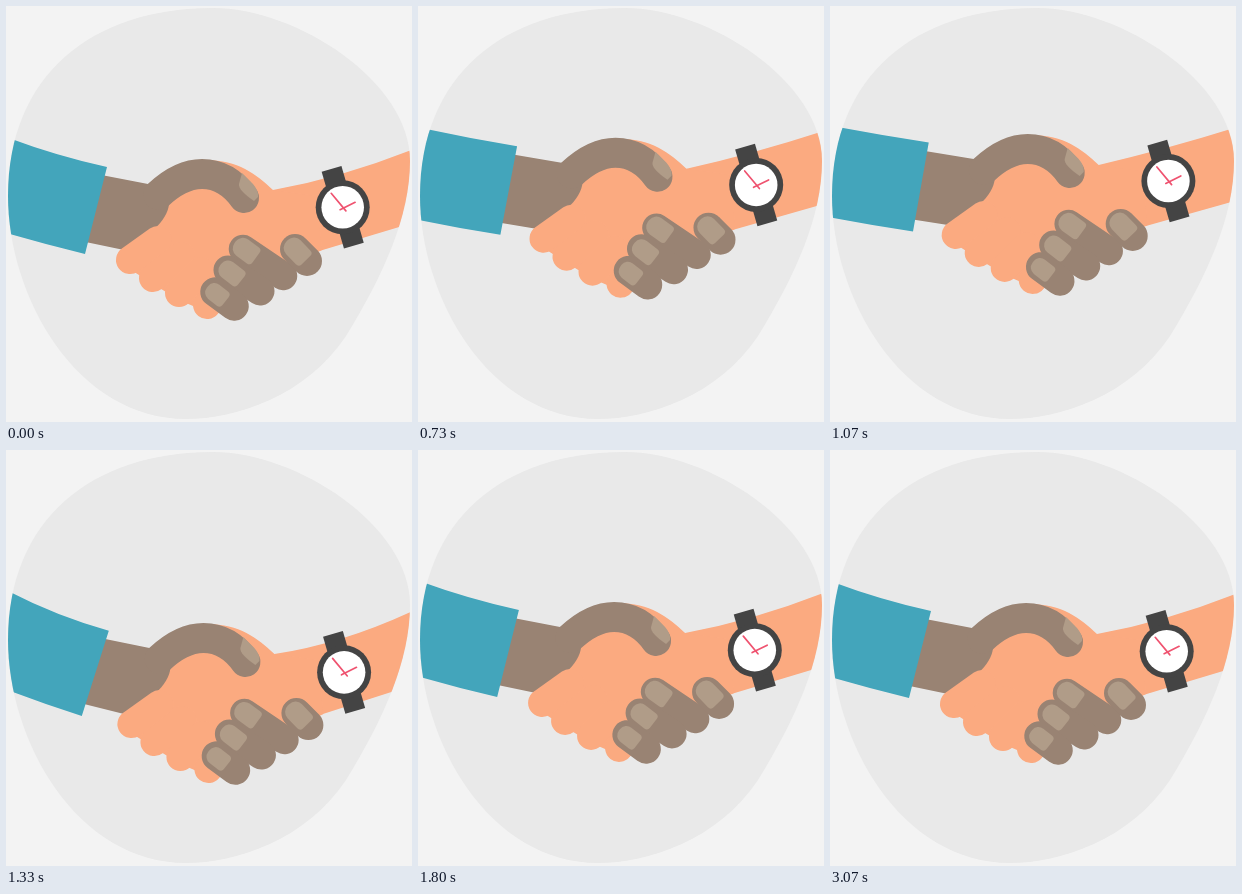
Recreate the animation shown at these times as an HTML page with a canvas. Size 406x416 px, loop 3.27 s.

```html
<!DOCTYPE html>
<html lang="en">
<head>
<meta charset="utf-8">
<title>Handshake</title>
<style>
html, body { margin: 0; width: 100%; height: 100%; overflow: hidden; background: #f3f3f3; }
canvas { display: block; width: 406px; height: 416px; }
</style>
</head>
<body>
<canvas id="stage"></canvas>
<script>
const W = 406, H = 416, LOOP = 3270, FRAMES = 49;
const SLEEVE = '#43a5bb', BROWN = '#998373', NAIL = '#b09c88', PEACH = '#fbaa80';
const DARK = '#444444', RED = '#ef5370';

const canvas = document.getElementById('stage');
const ctx = canvas.getContext('2d');
const dpr = window.devicePixelRatio || 1;
canvas.width = W * dpr;
canvas.height = H * dpr;

// Turning points of the shake: time in ms, vertical offset in px
const shake = [
  [0, 0], [215, 0], [420, 11], [633, -43], [893, 23],
  [1133, -35], [1375, 24], [1730, -1.2], [2100, 0], [LOOP, 0]
];

function offsetAt(t) {
  for (let i = 1; i < shake.length; i++) {
    const [t0, y0] = shake[i - 1], [t1, y1] = shake[i];
    if (t <= t1) {
      const p = (t - t0) / (t1 - t0);
      return y0 + (y1 - y0) * (1 - Math.cos(Math.PI * p)) / 2;
    }
  }
  return 0;
}

const blob = new Path2D(
  'M207 2C290 2 404 75 404 155C404 210 378 268 340 330' +
  'C300 390 230 413 180 413C70 413 2 290 2 190C2 70 85 2 207 2Z');

const palm = new Path2D(
  'M200 154C232 154 250 168 267 184L310 190L316 244L292 256L215 305L201 306' +
  'L173 294L147 278L122 262L116 243C140 235 162 214 163 198L178 178Z');

const thumbNail = new Path2D('M236 167L247 178Q253 185 252 191L248 195Q232 184 233 178Z');

function fill(path, color) {
  ctx.fillStyle = color;
  ctx.fill(path);
}

function line(x0, y0, x1, y1, width, color) {
  ctx.lineWidth = width;
  ctx.strokeStyle = color;
  ctx.beginPath();
  ctx.moveTo(x0, y0);
  ctx.lineTo(x1, y1);
  ctx.stroke();
}

function disc(x, y, r, color) {
  ctx.fillStyle = color;
  ctx.beginPath();
  ctx.arc(x, y, r, 0, Math.PI * 2);
  ctx.fill();
}

function nail(x, y, w, h, deg) {
  ctx.save();
  ctx.translate(x, y);
  ctx.rotate(deg * Math.PI / 180);
  ctx.fillStyle = NAIL;
  ctx.beginPath();
  ctx.roundRect(-w / 2, -h / 2, w, h, [h / 2 - 1, 4, 4, h / 2 - 1]);
  ctx.fill();
  ctx.restore();
}

function leftArm(d, dx) {
  const hx = 142 + dx;
  fill(new Path2D(
    `M80 ${166 + d * 0.93}L98 ${169.5 + d * 0.96}L${hx} ${178 + d}L${hx + 38} ${180 + d}` +
    `L${hx + 20} ${215 + d}L${hx - 18} ${246 + d}L118 ${244 + d}L70 ${234 + d * 0.9}Z`), BROWN);

  const xTop = 101 + d * 0.09, yTop = 161 + d * 0.98;
  const xEnd = 79 - d * 0.16, yEnd = 248 + d * 0.9;
  const yA = 131 + d * 0.45, yB = 227 + d * 0.62;
  fill(new Path2D(
    `M0 ${yA}Q${xTop / 2} ${(yA + yTop) / 2 + 4 + d * 0.12} ${xTop} ${yTop}` +
    `L${xEnd} ${yEnd}Q${xEnd / 2} ${(yB + yEnd) / 2 + 1} 0 ${yB}Z`), SLEEVE);
}

function rightArm(d, dx) {
  fill(new Path2D(
    `M${267 + dx} ${184 + d}Q338 ${171 + d * 1.12} 410 ${142 + d * 0.87}` +
    `L410 ${216 + d * 0.9}L${300 + dx} ${249 + d}L${255 + dx} ${230 + d}Z`), PEACH);
}

function watch(d, dx) {
  ctx.save();
  ctx.translate(336.7 + dx, 201.3 + d * 1.05);
  ctx.save();
  ctx.rotate(-16.2 * Math.PI / 180);
  ctx.fillStyle = DARK;
  ctx.fillRect(-10.3, -40, 20.6, 80);
  ctx.restore();
  disc(0, 0, 27, DARK);
  disc(0, 0, 21.3, '#ffffff');
  ctx.lineCap = 'round';
  line(-11.5, -14, 3.2, 3.6, 1.7, RED);
  line(-2.6, 2.4, 12.4, -5, 1.7, RED);
  ctx.restore();
}

function hands(d, dx) {
  ctx.save();
  ctx.translate(dx, d);
  ctx.lineCap = 'round';

  fill(palm, PEACH);
  line(124, 254, 152, 234, 28, PEACH);
  line(147, 272, 175, 250, 28, PEACH);
  line(173, 287, 195, 265, 28, PEACH);
  line(201, 299, 220, 275, 28, PEACH);

  ctx.lineWidth = 30;
  ctx.strokeStyle = BROWN;
  ctx.stroke(new Path2D('M152 189C168 174 182 168 196 168C214 168 228 178 238 192'));
  fill(thumbNail, NAIL);

  line(237, 243, 277, 270, 28.5, BROWN);
  line(222, 264, 254, 285, 29, BROWN);
  line(209, 286, 228, 300, 29.5, BROWN);
  line(289, 243, 301, 255, 30, BROWN);

  nail(239.5, 244, 26, 20, 36);
  nail(225, 266.5, 26, 19, 38);
  nail(210.5, 288, 23, 18, 38);
  nail(290.5, 244.5, 27, 20, 46);
  ctx.restore();
}

function draw(time) {
  const t = time % LOOP;
  // Held poses, about fifteen a second
  const step = LOOP / FRAMES;
  const d = offsetAt(Math.floor((t + 5) / step) % FRAMES * step);
  const dx = Math.min(Math.abs(d) * 0.07, 1.7);

  ctx.setTransform(dpr, 0, 0, dpr, 0, 0);
  ctx.fillStyle = '#f3f3f3';
  ctx.fillRect(0, 0, W, H);
  fill(blob, '#e9e9e9');
  ctx.save();
  ctx.clip(blob);
  leftArm(d, dx);
  rightArm(d, dx);
  hands(d, dx);
  watch(d, dx);
  ctx.restore();
}

const start = performance.now();
function tick() {
  draw(performance.now() - start);
  requestAnimationFrame(tick);
}
tick();
</script>
</body>
</html>
```
